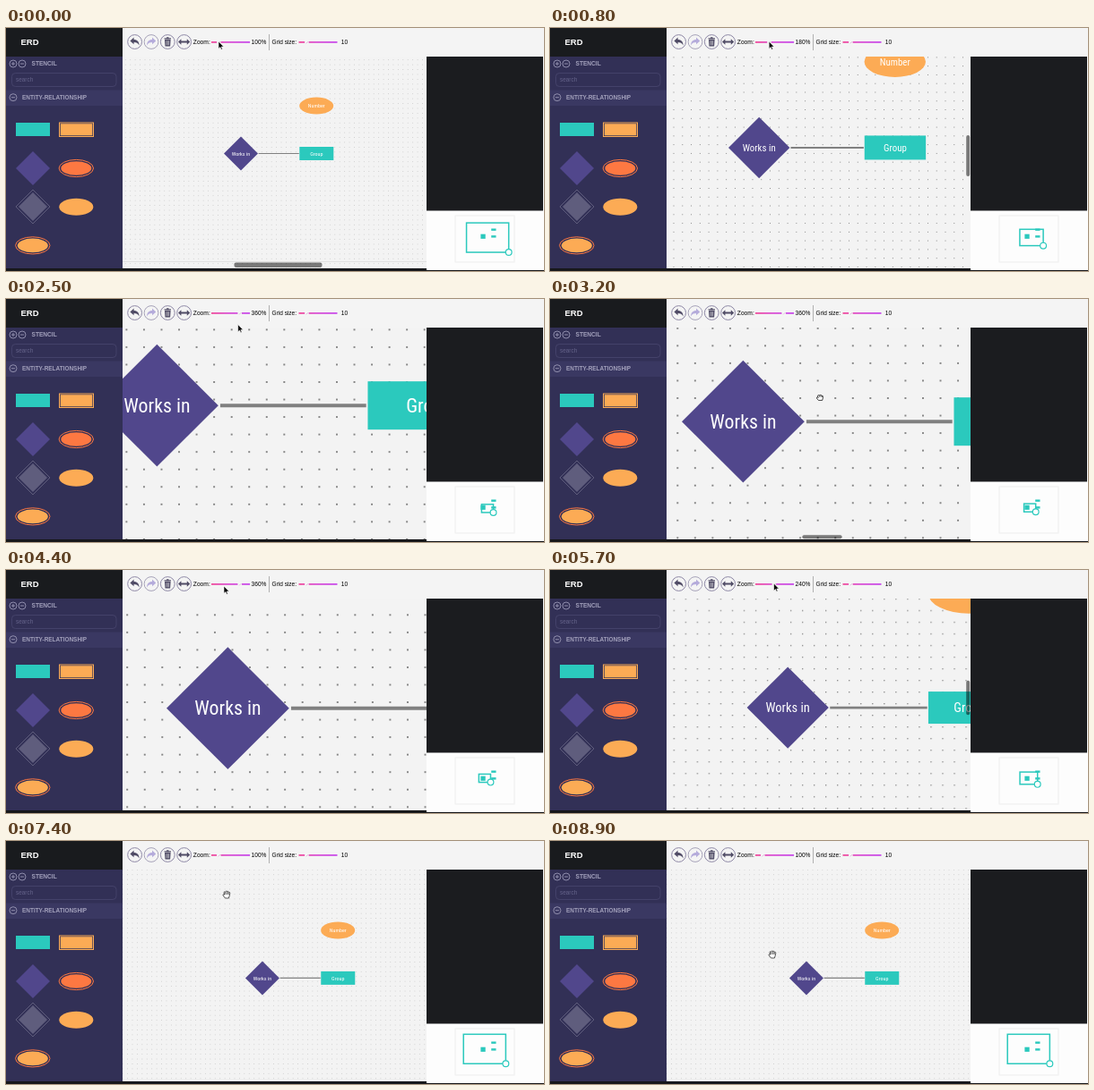
An HTML page for the animation above (9000 ms loop, 600x272 px).

```html
<!DOCTYPE html>
<html lang="en">
<head>
<meta charset="utf-8">
<title>Diagram editor: zoom and pan</title>
<style>
  html, body { margin: 0; width: 100%; height: 100%; overflow: hidden; background: #fff; }
  svg { display: block; width: 600px; height: 272px; }
  text { font-family: "Liberation Sans", Arial, sans-serif; font-size: 6.6px; }
  .heading { font-weight: bold; fill: #a3a1bc; }
  .label { font-family: "Roboto Condensed", Roboto, sans-serif; font-stretch: condensed;
           font-size: 6.05px; fill: #fff; text-anchor: middle; }
  .ring { fill: none; stroke: #8d87a5; stroke-width: 1; }
  .outline { fill: none; stroke-width: 1; }
  .icon { fill: #504c66; }
  .bar { fill: #000; fill-opacity: .5; }
</style>
</head>
<body>
<svg viewBox="0 0 600 272">
  <defs>
    <pattern id="dots" patternUnits="userSpaceOnUse">
      <rect id="dot" fill="#858585"/>
    </pattern>
    <linearGradient id="track" gradientUnits="userSpaceOnUse" x1="0" x2="43">
      <stop offset="0" stop-color="#f0388f"/>
      <stop offset=".45" stop-color="#d83fd0"/>
      <stop offset="1" stop-color="#c238ea"/>
    </linearGradient>
    <g id="knob">
      <circle r="2.4" fill="#f6f6f6"/>
      <path d="M-.6 1.4 1.6-.8" stroke="#d9a3d6" stroke-width=".8"/>
    </g>
  </defs>

  <!-- Paper -->
  <rect x="130" y="32" width="339" height="237" fill="#f3f3f3"/>
  <rect x="130" y="32" width="339" height="237" fill="url(#dots)"/>
  <g id="scene">
    <path d="M19.6 0H64.8" stroke="#808080" stroke-width="1.1"/>
    <path d="M0-19 19 0 0 19-19 0z" fill="#51478c"/>
    <rect x="65.3" y="-7.5" width="38" height="15" fill="#2bc9bd"/>
    <ellipse cx="84.2" cy="-53.4" rx="19" ry="9.5" fill="#fcab55"/>
    <text class="label" x="0" y="2.1">Works in</text>
    <text class="label" x="84.3" y="2.1">Group</text>
    <text class="label" x="84.2" y="-51.3">Number</text>
  </g>
  <path id="barTrack" d="M130 261.5H469" stroke="#dedede" stroke-width=".8"/>
  <rect id="hBar" class="bar" rx="2"/>
  <rect id="vBar" class="bar" x="464.2" width="4" rx="2"/>

  <!-- Sidebar -->
  <rect width="130" height="269" fill="#323056"/>
  <rect width="130" height="32" fill="#191b1e"/>
  <rect y="69.5" width="130" height="17.5" fill="#3a3862"/>
  <text x="16.5" y="19" style="font-size:9.5px;font-weight:bold" fill="#fff">ERD</text>
  <g fill="none" stroke="#9896b4" stroke-width=".9">
    <circle cx="8" cy="40" r="4"/><path d="M6 40h4M8 38v4"/>
    <circle cx="18" cy="40" r="4"/><path d="M16 40h4"/>
    <circle cx="8" cy="77.7" r="4"/><path d="M6 77.7h4"/>
    <rect x="6.5" y="50.5" width="116.5" height="15" rx="4" stroke="#47456c"/>
  </g>
  <text class="heading" x="28.5" y="42.3">STENCIL</text>
  <text x="11" y="60.2" fill="#65638a" style="font-size:6.4px">search</text>
  <text class="heading" x="18" y="80.2" style="font-size:6.45px">ENTITY-RELATIONSHIP</text>

  <rect x="11" y="106" width="38" height="15" fill="#2bc9bd"/>
  <rect class="outline" x="59.5" y="106" width="38" height="15.5" stroke="#fcab55"/>
  <rect x="60.7" y="107.2" width="35.6" height="13.1" fill="#fcab55"/>
  <path d="M30 138 49 157 30 176 11 157z" fill="#51478c"/>
  <path class="outline" d="M30 181 49 200 30 219 11 200z" stroke="#5f5d7d"/>
  <path d="M30 184 46 200 30 216 14 200z" fill="#5f5d7d"/>
  <ellipse class="outline" cx="78.3" cy="157" rx="19.2" ry="9.6" stroke="#fd7842"/>
  <ellipse cx="78.3" cy="157" rx="17" ry="7.8" fill="#fd7842"/>
  <ellipse cx="78.3" cy="200.2" rx="19" ry="9.5" fill="#fcab55"/>
  <ellipse class="outline" cx="29.8" cy="243.4" rx="19.2" ry="9.6" stroke="#fd7842"/>
  <ellipse cx="29.8" cy="243.4" rx="17" ry="7.8" fill="#fcab55"/>

  <!-- Toolbar -->
  <rect x="130" width="470" height="32" fill="#f4f4f4"/>
  <circle class="ring" cx="143.6" cy="15.5" r="7.9"/>
  <circle class="ring" cx="162" cy="15.5" r="7.9" opacity=".75"/>
  <circle class="ring" cx="180.3" cy="15.5" r="7.9"/>
  <circle class="ring" cx="198.6" cy="15.5" r="7.9"/>
  <path class="icon" d="M138.4 14.4 142.6 10.6V13C146.4 13 148.4 15.4 148.6 19.4 147.4 17 145.6 15.9 142.6 15.9V18.2z"/>
  <path d="M167.2 14.4 163 10.6V13C159.2 13 157.2 15.4 157 19.4 158.2 17 160 15.9 163 15.9V18.2z" fill="#b5acdb"/>
  <path class="icon" d="M176.6 11.2h2.2l.5-.9h2l.5.9h2.2v1.2h-7.4zM177 13h6.6l-.5 7.6h-5.6z"/>
  <path d="M179 14.2v5M180.3 14.2v5M181.6 14.2v5" stroke="#f4f4f4" stroke-width=".5"/>
  <path class="icon" d="M192 15.5 195.4 12.3V14.6H201.8V12.3L205.2 15.5 201.8 18.7V16.4H195.4V18.7z"/>
  <text x="208.8" y="18" style="font-size:6.7px">Zoom:</text>
  <text id="percent" x="273.6" y="18"></text>
  <path d="M293.5 7V25" stroke="#aaa" stroke-width=".9"/>
  <text x="296.6" y="18" style="font-size:6.5px">Grid size:</text>
  <text x="373.8" y="18">10</text>
  <g transform="translate(229 15.9)"><rect y="-.8" width="43" height="1.6" fill="url(#track)"/></g>
  <g transform="translate(326.5 15.9)"><rect y="-.8" width="43" height="1.6" fill="url(#track)"/></g>
  <use id="handle" href="#knob" y="16"/>
  <use href="#knob" x="335.4" y="16"/>

  <!-- Inspector and navigator -->
  <rect y="269" width="600" height="3" fill="#17181b"/>
  <rect x="469" y="32" width="131" height="239" fill="#fdfdfd"/>
  <rect x="469" y="32" width="130" height="172.5" fill="#1b1c1f"/>
  <rect x="501" y="210" width="66" height="52" fill="#fdfdfd" stroke="#ececec" stroke-width=".9"/>
  <g transform="translate(-.6 0)">
    <g fill="#2bc9bd">
      <rect x="530" y="230.7" width="5.3" height="5.2"/>
      <rect x="541.8" y="224.5" width="5.3" height="2.4"/>
      <rect x="541.8" y="232.2" width="5.3" height="2.4"/>
    </g>
    <rect id="view" fill="none" stroke="#2bc9bd" stroke-width="1.5"/>
    <circle id="grip" r="3.4" fill="#fff" stroke="#2bc9bd" stroke-width="1.2"/>
  </g>

  <!-- Pointers, each drawn around its own hot spot -->
  <path id="pointer" d="M0 0V8.2L1.9 6.5 3.1 9.2 4.4 8.6 3.2 6H5.8z" fill="#000" stroke="#fff" stroke-width=".6"/>
  <g id="openHand" fill="#fff" stroke="#222" stroke-width=".75" stroke-linejoin="round">
    <path d="M-1.5 4 -4 .8C-4.4-.4-3.2-.8-2.4.2L-2.9-2.4C-2.8-3.6-1.7-3.5-1.4-2.5L-1-3.4C-.6-4.5.6-4.3.7-3.2 1.3-4.1 2.3-3.6 2.3-2.5 3-3.1 3.9-2.6 3.8-1.6L3 2 2.4 4z"/>
    <path d="M-1.4-2.5-.9 0M.7-3.2.8-.2M2.3-2.5 2.1 0" fill="none"/>
  </g>
  <g id="closedHand" fill="#fff" stroke="#222" stroke-width=".85" stroke-linejoin="round">
    <path d="M-1.6 3.4-3.4 1.2C-3.8 0-3 -.5-2.4-.2L-2.5-1.6C-2.2-2.7-1.2-2.6-.8-2 -.2-3 .8-2.8 1-2 1.7-2.7 2.5-2.2 2.6-1.5 3.5-1.8 3.7-.8 3.5.2L2.7 3.4z"/>
    <path d="M-2.4-.2-1.6 1M-.8-2V-.3M1-2V-.3M2.6-1.5V-.1" fill="none"/>
  </g>
</svg>

<script>
const LOOP = 9000, STEP = 100;
const PAPER = { x: 130, y: 32, w: 339, h: 237 };
const GRID = 5.43, GRID_SHIFT = { x: -3.79, y: -3.39 };
const MAP = 0.139, MAP_X = 532.5, MAP_Y = 233.2;
const HOME = { x: 262, y: 140.5 };
const FOCUS_IN = { x: 298, y: 148.7 }, FOCUS_OUT = { x: 300.8, y: 152.9 };
const MAX_ZOOM = 3.6, PAN_START = 3000, PAN_END = 3900;

// Keys are [time, value...]
const zoomKeys = [[0, 1], [1000, 2], [1700, 3], [2000, 3], [2400, 3.6], [4900, 3.6], [6000, 2], [6400, 1.4], [6700, 1]];
const panKeys = [[PAN_START, 0, 0], [3200, 47, 18], [3500, 67, 29], [PAN_END, 79, 35.5]];
const cursorKeys = [[2400, 260.5, 16], [2650, 256, 50], [2900, 254, 92]];
const returnKeys = [[PAN_END, 333, 127.5], [4100, 312, 96], [4400, 243, 19], [4700, 260.5, 16]];
const leaveKeys = [[6900, 237, 16], [7400, 246, 60], [7900, 268, 122], [8400, 256, 130], [8800, 248, 127]];

const el = id => document.getElementById(id);
const set = (id, attrs) => { for (const k in attrs) el(id).setAttribute(k, attrs[k]); };
const show = (id, on) => set(id, { visibility: on ? "visible" : "hidden" });
const within = (t, a, b) => t >= a && t < b;

function along(keys, t) {
  if (t <= keys[0][0]) return keys[0].slice(1);
  const i = keys.findIndex(k => k[0] > t);
  if (i < 0) return keys[keys.length - 1].slice(1);
  const a = keys[i - 1], b = keys[i], p = (t - a[0]) / (b[0] - a[0]);
  return a.slice(1).map((v, n) => v + (b[n + 1] - v) * p);
}

const scaleAbout = (point, focus, k) => ({
  x: focus.x + (point.x - focus.x) * k,
  y: focus.y + (point.y - focus.y) * k
});

function originAt(t, zoom) {
  if (t < PAN_START) return scaleAbout(HOME, FOCUS_IN, zoom);
  const start = scaleAbout(HOME, FOCUS_IN, MAX_ZOOM), [dx, dy] = along(panKeys, t);
  return scaleAbout({ x: start.x + dx, y: start.y + dy }, FOCUS_OUT, zoom / MAX_ZOOM);
}

function cursorAt(t, zoom) {
  if (within(t, 2400, PAN_START)) return along(cursorKeys, t);
  if (within(t, PAN_START, PAN_END)) {
    const [dx, dy] = along(panKeys, t);
    return [254 + dx, 92 + dy];
  }
  if (within(t, PAN_END, 4800)) return along(returnKeys, t);
  if (t >= 6900) return along(leaveKeys, t);
  return [237 + (zoom - 1) * 9, 16];
}

function draw(t) {
  const zoom = Math.round(along(zoomKeys, t)[0] * 5 + 1e-6) / 5;
  const o = originAt(t, zoom);

  set("scene", { transform: `translate(${o.x} ${o.y}) scale(${zoom})` });
  const gap = GRID * zoom, size = 0.54 * zoom;
  set("dots", { x: o.x + GRID_SHIFT.x * gap, y: o.y + GRID_SHIFT.y * gap, width: gap, height: gap });
  set("dot", { width: size, height: size });

  el("percent").textContent = Math.round(zoom * 100) + "%";
  set("handle", { x: 237.3 + (zoom - 1) * 9 });

  const k = MAP / zoom;
  const vx = MAP_X - (o.x - PAPER.x) * k, vy = MAP_Y - (o.y - PAPER.y) * k;
  const vw = PAPER.w * k, vh = PAPER.h * k;
  set("view", { x: vx, y: vy, width: vw, height: vh });
  set("grip", { cx: vx + vw, cy: vy + vh });

  const shrink = Math.pow(zoom, -0.62), hLen = 98 * shrink, vLen = 66 * shrink;
  const wide = t < 400;
  set("hBar", { x: 303.5 - hLen / 2, y: wide ? 262.5 : 264.3, width: hLen, height: wide ? 5.5 : 4 });
  set("vBar", { y: 143 - vLen / 2, height: vLen });
  show("barTrack", wide);
  show("hBar", wide || within(t, 3000, 4200));
  show("vBar", within(t, 300, 2300) || within(t, 5000, 7400));

  const [cx, cy] = cursorAt(t, zoom);
  const dragging = within(t, 2900, PAN_END), onPaper = cy > 32;
  const active = dragging ? "closedHand" : onPaper ? "openHand" : "pointer";
  for (const id of ["pointer", "openHand", "closedHand"]) show(id, id === active);
  set(active, { transform: `translate(${cx} ${cy - (active === "pointer" ? 1 : 0)})` });
}

const begin = performance.now();
function tick() {
  const t = (performance.now() - begin) % LOOP;
  draw(Math.floor(t / STEP) * STEP);
  requestAnimationFrame(tick);
}
tick();
</script>
</body>
</html>
```
